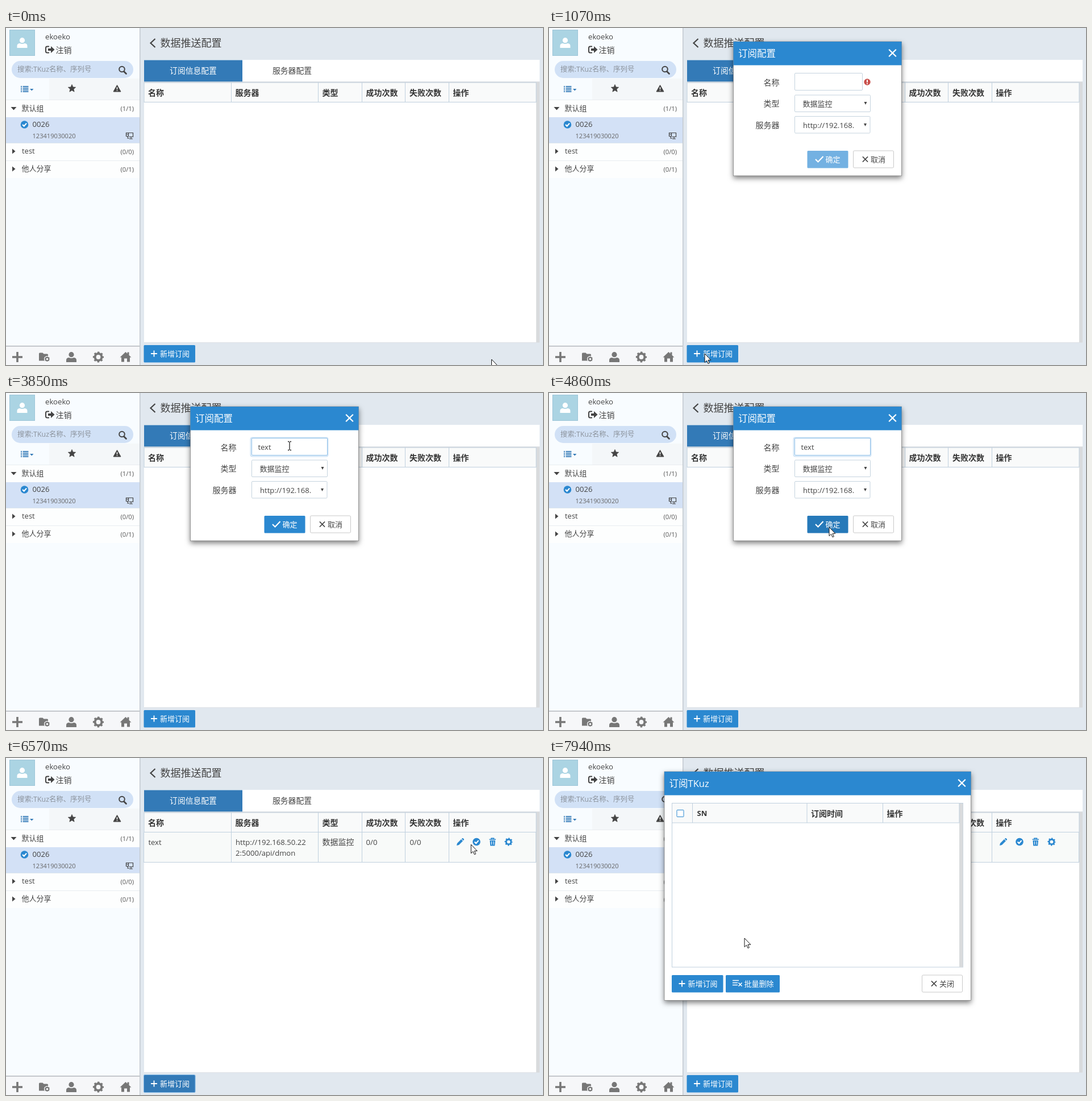
Animation, 945 px wide and 593 px high, one loop 8000 ms. Source, as an HTML page:

```html
<!DOCTYPE html>
<html lang="zh-CN">
<head>
<meta charset="utf-8">
<style>
html, body { margin: 0; width: 100%; height: 100%; overflow: hidden; }
svg { display: block; width: 100vw; height: 100vh; }
text { font-family: "Open Sans", "Noto Sans CJK SC", "Noto Sans CJK", sans-serif; white-space: pre; }
.dialog { filter: drop-shadow(0 4px 5px rgba(0,0,0,.5)); }
</style>
</head>
<body>
<svg id="stage" viewBox="0 0 945 593" preserveAspectRatio="none"></svg>
<script>
const BLUE = '#2b88d0', DEEP = '#337ab7', INK = '#444', LINE = '#c0d0de', GREY = '#777';
const LOOP = 8000;

// Shape helpers; text is placed by its vertical centre.
const rect = (x, y, w, h, fill, more = '') =>
  `<rect x="${x}" y="${y}" width="${w}" height="${h}" fill="${fill}" ${more}/>`;
const box = (x, y, w, h, fill, line, r = 1.5, more = '') =>
  rect(x + .5, y + .5, w - 1, h - 1, fill, `stroke="${line}" rx="${r}" ${more}`);
const text = (x, y, s, size = 14, fill = INK, more = '') =>
  `<text x="${x}" y="${y + size * .36}" font-size="${size}" fill="${fill}" ${more}>${s}</text>`;
const bold = (x, y, s, size = 14) => text(x, y, s, size, '#333', 'font-weight="700"');
const fillPath = (d, c = INK, more = '') => `<path d="${d}" fill="${c}" ${more}/>`;
const line = (d, c = INK, w = 1, more = '') =>
  `<path d="${d}" fill="none" stroke="${c}" stroke-width="${w}" ${more}/>`;
const circle = (x, y, r, c, more = '') => `<circle cx="${x}" cy="${y}" r="${r}" fill="${c}" ${more}/>`;
const at = (x, y, s) => `<g transform="translate(${x} ${y})">${s}</g>`;
const group = (id, s, more = '') => `<g id="${id}" ${more}>${s}</g>`;

// Icons
const gear = (x, y, r, c) => {
  const tooth = 2 * Math.PI * r * .85 / 16;
  return circle(x, y, r * .62, 'none', `stroke="${c}" stroke-width="${r * .42}"`) +
    circle(x, y, r * .85, 'none', `stroke="${c}" stroke-width="${r * .32}" stroke-dasharray="${tooth}" stroke-dashoffset="${tooth / 2}"`);
};
const plus = (x, y, r, c, w) => line(`M${x - r} ${y}h${2 * r}M${x} ${y - r}v${2 * r}`, c, w);
const cross = (x, y, r, c, w) => line(`M${x - r} ${y - r}l${2 * r} ${2 * r}m0 ${-2 * r}l${-2 * r} ${2 * r}`, c, w);
const person = (x, y, k, c) => at(x, y, `<g transform="scale(${k})">` +
  circle(0, -4.3, 4.6, c) + fillPath('M-9 9V5.5Q-9 1-4 1Q0 3 4 1Q9 1 9 5.5V9Z', c) + '</g>');
const check = (x, y, r, c) => circle(x, y, r, c) +
  line(`M${x - r * .5} ${y}l${r * .38} ${r * .4} ${r * .65}-${r * .75}`, '#fff', r * .32);
const pick = (x, y) => fillPath(`M${x} ${y}h5l-2.5 5z`);
const star = (x, y, r) => {
  const pts = [...Array(10).keys()].map(i => {
    const a = i * Math.PI / 5 - Math.PI / 2, q = i % 2 ? r * .45 : r;
    return `${x + q * Math.cos(a)} ${y + q * Math.sin(a)}`;
  });
  return fillPath('M' + pts.join('L') + 'Z', INK, `stroke="${INK}" stroke-width=".8" stroke-linejoin="round"`);
};

function sidebar() {
  const end = 'text-anchor="end"';
  let s = rect(0, 0, 235, 593, '#f8fcff') + rect(6, 3, 45, 46, '#abd4e3') + box(6, 3, 45, 46, 'none', '#9dc5d8', 0) +
    person(28.5, 26, 1, '#fff') + text(69, 15.5, 'ekoeko', 13.2) + text(87.5, 38.5, '注销');
  s += line('M76 32.5h-3.5q-2.5 0-2.5 2.5v6q0 2.5 2.5 2.5h3.5', INK, 2) +
    fillPath('M74 36h5v-4l6.5 6-6.5 6v-4h-5z');
  s += rect(10, 58, 214, 30, '#d1e1f6', 'rx="15"') + text(20, 73, '搜索:TKuz名称、序列号', 12.4, '#8b929b') +
    circle(204, 72.5, 4.8, 'none', `stroke="${INK}" stroke-width="2"`) +
    line('M207.5 76.5l4 4', INK, 2.6, 'stroke-linecap="round"');
  s += rect(76, 89, 159, 38, '#f4f7f9');
  for (let i = 0; i < 4; i++) s += rect(26, 102 + i * 3, 2, 1.8, DEEP) + rect(29.5, 102 + i * 3, 10, 1.8, DEEP);
  s += fillPath('M42 107h6.5l-3.25 3.5z', DEEP) + star(116, 106.5, 7);
  s += fillPath('M195.5 100.5l6.5 11.5h-13z', INK, `stroke="${INK}" stroke-linejoin="round"`) +
    line('M195.5 104v4m0 1.2v1.6', '#fff', 1.5);
  s += rect(0, 126, 235, 138, '#fdfefe') + rect(0, 126, 235, 1, '#e9edf0') + rect(0, 157, 235, 46, '#d3e1f6') +
    rect(0, 233, 235, 1, '#e9edf0') + rect(0, 202, 235, 1, '#dde6ef');
  s += fillPath('M8.5 139h10l-5 5.5z') + fillPath('M11 212.5v9l5.5-4.5z') + fillPath('M11 243.5v9l5.5-4.5z');
  s += text(27.5, 141, '默认组', 13) + text(28, 216.5, 'test', 13) + text(27.5, 247.5, '他人分享', 13);
  [['(1/1)', 142], ['(0/0)', 218], ['(0/1)', 249]].forEach(([v, y]) => s += text(225, y, v, 11.2, '#555', end));
  s += check(32.5, 170, 6.8, BLUE) + text(46.5, 169.5, '0026', 13.1) + text(46.5, 190, '123419030020', 11.1, '#666');
  s += line('M216 184.5h7.5v7h-7m3.5 0v3m-3 .5h6M211.5 184.5h4v6h-4zM212 187h3M214 191v3h3', INK, 1.2);
  s += rect(0, 560, 235, 33, '#f6f7f9') + rect(0, 559, 235, 1.5, '#b4b8bc');
  s += plus(20, 579, 9, GREY, 3.6) + person(115, 579, 1, GREY) + gear(162.5, 579, 9.5, GREY);
  s += fillPath('M58 573q0-1.5 1.500-1.500h5l2 2h6q1.500 0 1.500 1.500v10.500h-16z', GREY) +
    circle(72.5, 582.5, 5.5, '#f6f7f9') + gear(72.5, 582.5, 4.5, GREY);
  s += fillPath('M200.500 579.500L210.500 570l3 3v-2.500h3v5.300l4 3.700h-2.500v8h-5v-6h-5v6h-5v-8z', GREY);
  return s + rect(235, 0, 1.5, 593, '#c3c9cf');
}

function button(x, y, w, label, mark, fill, id) {
  return rect(x, y, w, 30.5, fill, `rx="1.5" ${id ? `id="${id}"` : ''}`) + mark + text(x + 28.5, y + 15.5, label, 13, '#fff');
}
function plainButton(x, y, label) {
  return box(x, y, 72, 31, '#fff', '#c9c9c9', 2) + cross(x + 21.5, y + 15.5, 4.6, INK, 1.5) + text(x + 31, y + 15.5, label, 13);
}
const columns = (xs, y0, y1) => xs.map(x => rect(x, y0, 1, y1 - y0, LINE)).join('');

function mainPane() {
  const mid = 'text-anchor="middle"';
  let s = rect(236, 0, 709, 593, '#e1e8ef') + line('M262.500 19l-8 7.500 8 7.500', INK, 2.2) + text(271.5, 26.5, '数据推送配置', 18);
  s += rect(243, 56, 696, 38, '#fff') + rect(243, 56.5, 173, 38, DEEP) + text(329.5, 75.5, '订阅信息配置', 13.8, '#fff', mid) +
    text(503.5, 75.5, '服务器配置', 13.8, INK, mid);
  s += rect(243, 94.5, 696, 459, '#d9dbdd') + rect(243, 96, 690, 457, '#fff');
  s += box(242.5, 95.5, 691, 35.5, '#f9fafa', LINE, 0) + columns([396, 549, 626, 702, 779], 96, 131);
  ['名称', '服务器', '类型', '成功次数', '失败次数', '操作'].forEach((v, i) =>
    s += bold([250, 403.5, 556.5, 633.5, 710, 786.5][i], 113.5, v));
  const y = 148;
  s += group('row', rect(243, 131, 690, 53, '#f8faf9') + rect(243, 183, 690, 1, LINE) +
    columns([242, 396, 549, 626, 702, 779, 932], 131, 184) +
    text(250.5, y, 'text', 13) + text(404, y, 'http://192.168.50.22', 13.1) + text(404, 167, '2:5000/api/dmon', 13.1) +
    text(556.5, y, '数据监控') + text(633.5, y, '0/0', 13.2) + text(710.5, y, '0/0', 13.2) +
    fillPath('M793 154l1-4 7-7 3 3-7 7zM801.800 142.200l1-1q.8-.6 1.600 0l1.400 1.400q.6.8 0 1.600l-1 1z', BLUE) +
    check(828, 147.5, 6.8, BLUE) +
    line('M850.500 143.200h11.500M854 142.500v-1.300h4.500v1.300', BLUE, 1.5) + fillPath('M851.500 145h9.500l-.8 9.500h-8z', BLUE) +
    line('M854.500 146.500v6m3.500-6v6', '#fff', 1) + gear(884.5, 147.5, 7, BLUE) +
    group('gearFocus', box(871.5, 137.5, 25.5, 22.5, 'none', '#6aa2dc', 1)));
  s += button(242.5, 558, 90.5, '新增订阅', plus(260.5, 573, 5.5, '#fff', 1.8), BLUE, 'add') +
    group('addFocus', box(242, 557, 91.5, 32, 'none', '#7fb5e3', 1.5));
  return s;
}

const frame = (x, w, h, title) => rect(x, 24, w, h, '#fff', 'stroke="#777" stroke-width=".7"') +
  rect(x, 24, w, 41.5, BLUE) + text(x + 8.5, 45, title, 16.5, '#fff') + cross(x + w - 16, 44, 6.3, '#fff', 2.2);

function formDialog() {
  let s = group('formBack', frame(324.5, 296, 236, '订阅配置'), 'class="dialog"');
  s += text(377.5, 95.5, '名称') + text(377.5, 133, '类型') + text(363.5, 171, '服务器');
  s += group('fieldGlow', rect(430.5, 78.5, 136, 33, 'none', 'rx="3" stroke="#cfe4f6" stroke-width="2"')) +
    rect(432.5, 79.5, 119, 30, '#fff', 'id="field" rx="1.500"') + text(443.5, 95, '', 13, INK, 'id="typed"') +
    rect(466, 87, 1, 16, '#222', 'id="caret"');
  s += group('alert', circle(560, 95, 5.7, '#c9504c') + line('M560 91.300v4.500m0 1.200v1.800', '#fff', 2));
  s += box(432, 117.5, 134, 30.5, '#fff', '#c5d3de') + text(446.5, 133.5, '数据监控', 13) + pick(554.5, 130) +
    box(432, 155, 133.5, 30.5, '#fff', '#c5d3de') + text(447, 171, 'http://192.168.', 13.1) + pick(554, 168);
  s += group('confirm', rect(454.5, 216, 72, 30.5, 'inherit', 'rx="1.500"')) +
    line('M469 231l4.500 4.500 9-9.500', '#fff', 2.2) + text(486.5, 231, '确定', 13, '#fff');
  return s + plainButton(535, 215.5, '取消');
}

function listDialog() {
  let s = `<g class="dialog">${frame(203, 539.5, 402.5, '订阅TKuz')}</g>`;
  s += rect(216.5, 79.5, 512, 288.5, '#fff', `stroke="${LINE}"`) + rect(722, 80, 6.5, 288, '#d9dbdd') +
    box(216, 79, 506.5, 35.5, '#f9fafa', LINE, 0) + columns([252, 453.5, 587], 80, 114);
  s += box(224.5, 91, 13, 13, '#fff', BLUE, 1) + bold(260.5, 97.5, 'SN', 13) + bold(461, 97.5, '订阅时间') + bold(594.5, 97.5, '操作');
  s += button(216, 382, 90.5, '新增订阅', plus(234, 397, 5.5, '#fff', 1.8), BLUE);
  s += rect(311, 382, 95, 30.5, BLUE, 'rx="1.500"') + line('M323 391.500h11m-11 4h9m-9 4h9', '#fff', 1.7) +
    cross(336.5, 398.5, 3, '#fff', 1.7) + text(343.5, 397.5, '批量删除', 13, '#fff');
  return s + plainButton(656, 381.5, '关闭');
}

const pointers =
  group('arrow', fillPath('M0 0V15.500L3.600 12.200 6 17.600 8.300 16.600 6 11.300H10.800Z', '#fff', 'stroke="#111" stroke-width="1"')) +
  group('hand', fillPath('M0 12V2A1.700 1.700 0 0 1 3.400 2V8Q5.800 7 6.400 8.800Q8.600 8 9.200 9.600Q11.800 9.200 11.800 11.600V15Q11.800 18 10 20.500H2.500Q1 17.500-2.400 13.400Q-3 11.400-1.400 11Z', '#fff', 'stroke="#111" stroke-width="1.100"') +
    line('M3.400 8v4m3-3v3m3-2v2', '#111', .9)) +
  group('beam', line('M-3-7.500h2.300M.700-7.500h2.300M0-7V7M-3 7.500h2.300M.700 7.500h2.300', '#222', 1.3));

const stage = document.getElementById('stage');
stage.innerHTML = mainPane() + sidebar() + group('form', formDialog()) + group('list', listDialog()) + group('pointer', pointers);
const $ = id => document.getElementById(id);
const show = (id, on) => $(id).setAttribute('visibility', on ? 'inherit' : 'hidden');
const fade = (id, v) => { $(id).setAttribute('opacity', v); show(id, v > 0); };

// Pointer strokes: first step, last step, step count, then [progress, x, y].
const moves = [
  [70, 690, 9, [0, 854.5, 583], [.3, 690, 450], [.5, 520, 421], [.8, 250, 545], [1, 274, 573]],
  [1230, 1230, 1, [0, 274, 573], [1, 403, 351]],
  [1460, 2000, 8, [0, 403, 351], [.5, 500, 180], [.7, 545, 108], [.85, 515, 88], [1, 499, 93]],
  [4170, 4710, 8, [0, 499, 93], [.5, 508, 160], [1, 493, 236]],
  [5650, 6430, 11, [0, 493, 236], [1 / 11, 583, 232], [.5, 800, 178], [.75, 857, 154], [1, 815, 153]],
  [6500, 7250, 11, [0, 815, 153], [.35, 828, 150], [.7, 860, 150], [1, 885, 144.5]],
  [7630, 7940, 5, [0, 885, 144.5], [.4, 640, 235], [1, 344, 317]]
];
function pointerAt(t) {
  let pos = moves[0][3].slice(1);
  for (const [from, to, n, ...keys] of moves) {
    if (t < from) break;
    const gap = (to - from) / (n - 1 || 1) || 1;
    const p = Math.min(n, Math.floor((t - from) / gap + 1e-6) + 1) / n;
    const i = Math.max(1, keys.findIndex(k => k[0] >= p - 1e-9));
    const [a, b] = [keys[i - 1], keys[i]], f = (p - a[0]) / (b[0] - a[0]);
    pos = [a[1] + (b[1] - a[1]) * f, a[2] + (b[2] - a[2]) * f];
  }
  return pos;
}

function draw(t) {
  const within = (a, b) => t >= a && t < b;
  fade('form', within(920, 5010) ? (t < 1000 ? .6 : 1) : 0);
  fade('list', t < 7480 ? 0 : t < 7560 ? .6 : 1);
  show('row', t >= 5090);
  show('gearFocus', within(7330, 7480));
  show('addFocus', within(5010, 7330));
  $('add').setAttribute('fill', within(840, 920) || within(5010, 7330) ? DEEP : BLUE);

  const valid = t >= 2620, focus = t >= 2540;
  const count = [2620, 2700, 3230, 3300].filter(k => t >= k).length;
  $('typed').textContent = 'text'.slice(0, count);
  $('field').setAttribute('width', valid ? 133 : 119);
  $('field').setAttribute('stroke', valid ? '#8fc0e8' : focus ? '#a94442' : '#c5d3de');
  show('fieldGlow', valid);
  show('alert', !valid);
  show('caret', within(2620, 3850) || within(4380, 4860));
  $('caret').setAttribute('x', [444, 449, 455.5, 462, 466.5][count]);
  $('confirm').setAttribute('fill', !valid ? '#73b1e2' : t >= 4630 ? '#2679b9' : BLUE);

  const [x, y] = pointerAt(t);
  const onField = within(1460, 5010) && x > 432 && x < 552 && y > 79 && y < 110;
  const onIcon = within(5650, 7560) && Math.abs(y - 148) < 8 && [799, 828, 856, 885].some(c => Math.abs(x - c) < 9);
  show('beam', onField);
  show('hand', onIcon);
  show('arrow', !onField && !onIcon);
  $('pointer').setAttribute('transform', `translate(${x} ${y})`);
}

const start = performance.now();
function tick() {
  draw((performance.now() - start) % LOOP);
  requestAnimationFrame(tick);
}
draw(0);
requestAnimationFrame(tick);
</script>
</body>
</html>
```
